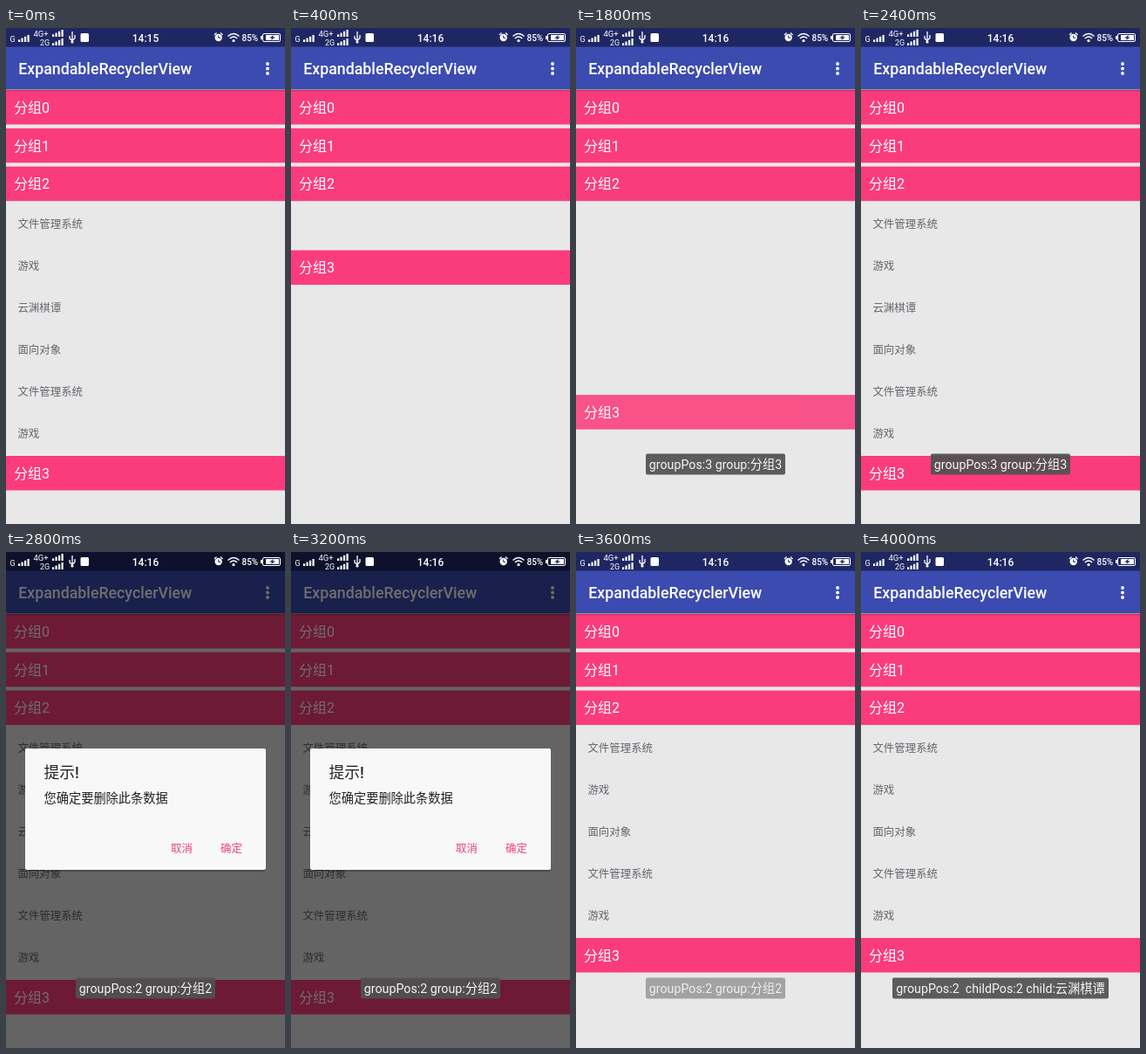
These frames come from a looping animation (320 by 568 pixels, 4200 ms). An HTML page:

```html
<!DOCTYPE html>
<html lang="zh-CN">
<head>
<meta charset="utf-8">
<style>
html, body { margin: 0; width: 100%; height: 100%; overflow: hidden; background: #e8e8e8; }
svg { display: block; width: 320px; height: 568px; }
text { font-family: Roboto, "Noto Sans CJK SC", "Noto Sans CJK", sans-serif; white-space: pre; }
</style>
</head>
<body>
<svg id="stage" viewBox="0 0 320 568"></svg>
<script>
const LOOP = 4200, STEP = 200;
const PINK = '#fb3c7c';
const stage = document.getElementById('stage');
const filesA = ['文件管理系统', '游戏', '云渊棋谭', '面向对象', '文件管理系统', '游戏'];
const filesB = ['文档', '程序', 'nub4', '非面向对象', '文档', '程序', 'nub4'];

const ramp = (t, a, b) => Math.min(1, Math.max(0, (t - a) / (b - a)));
const ease = p => (1 - Math.cos(Math.PI * p)) / 2;
const text = (s, x, y, size, fill, extra = '') =>
  `<text x="${x}" y="${y}" font-size="${size}" fill="${fill}" ${extra}>${s}</text>`;
const rect = (x, y, w, h, fill, extra = '') =>
  `<rect x="${x}" y="${y}" width="${w}" height="${h}" fill="${fill}" ${extra}/>`;
const fade = (alpha, body) => alpha > 0 ? `<g opacity="${alpha}">${body}</g>` : '';
const groupTop = i => 71 + 43.8 * i;

function group(i, y, alpha = 1) {
  return fade(alpha, rect(0, y, 320, 39.5, PINK) + text('分组' + i, 9, y + 25.7, 16, '#fff'));
}

function children(list, top, alpha) {
  return fade(alpha, list.map((s, i) => text(s, 13.4, top + 28.6 + 48 * i, 12.44, '#63666d')).join(''));
}

function signal(x, base, h) {
  return [0, 1, 2, 3].map(i => {
    const bar = h * (i + 1.5) / 4.5;
    return rect(x + 3.5 * i, base - bar, 2.2, bar, '#fff');
  }).join('');
}

function statusBar(clock) {
  const line = d => `<path d="${d}" fill="none" stroke="#fff" stroke-width="1.3"/>`;
  return signal(14, 16, 8) + signal(53, 10, 8) + signal(53, 20, 8) +
    text('G', 4.5, 16, 9, '#fff') + text('4G+', 31.5, 10, 9.5, '#fff') + text('2G', 39, 20, 9, '#fff') +
    line('M76 4V17M73 9v3l3 2.5l3-3V8') + '<circle cx="76" cy="16" r="1.6" fill="#fff"/>' +
    rect(85.5, 6, 9.5, 10, '#fff', 'rx="1.5"') +
    text(clock, 160, 15.5, 12, '#fff', 'text-anchor="middle" font-weight="500"') +
    '<circle cx="243.7" cy="11" r="4.2" fill="#fff"/>' +
    '<path d="M243.7 8.5V11.3H246" fill="none" stroke="#1f2763"/>' +
    line('M239 8l2.5-2.5M246 5.5L248.5 8') +
    line('M254.5 9.5q6.5-6 13 0M256.8 12q4.2-4 8.4 0') + '<circle cx="261" cy="14.6" r="1.6" fill="#fff"/>' +
    text('85%', 270.5, 15, 10, '#fff', 'font-weight="500"') +
    '<rect x="294.5" y="6.5" width="20" height="9" rx="1.5" fill="none" stroke="#fff"/>' +
    rect(292, 9, 2, 4, '#fff') + rect(298, 8, 15, 6, '#fff') +
    '<path d="M307 8l-5 3.5h3l-1 2.5l5-3.5h-3z" fill="#1f2763"/>';
}

function appBar() {
  return rect(0, 0, 320, 22, '#1f2763') + rect(0, 21.5, 320, 48.5, '#3b4bb0') +
    rect(0, 70, 320, 1.2, '#000', 'opacity=".35"') + rect(0, 71.2, 320, 1.5, '#000', 'opacity=".12"') +
    text('ExpandableRecyclerView', 14.2, 53, 17.78, '#fff', 'font-weight="500"') +
    [41, 46.5, 52].map(y => `<circle cx="300" cy="${y}" r="1.9" fill="#fff"/>`).join('');
}

function dialog() {
  return rect(22, 227, 276, 139, '#000', 'rx="3" opacity=".25"') +
    rect(22, 225, 276, 139, '#f8f8f8', 'rx="2"') +
    text('提示!', 43.5, 259, 17.78, '#222', 'font-weight="500"') +
    text('您确定要删除此条数据', 43.5, 287, 14.22, '#222') +
    text('取消', 189, 344, 12.44, '#f0437f', 'font-weight="500"') +
    text('确定', 246, 344, 12.44, '#f0437f', 'font-weight="500"');
}

function toast(s, w, alpha) {
  return fade(alpha, rect(160 - w / 2, 487.5, w, 24, '#505250', 'rx="2" opacity=".92"') +
    text(s, 160, 504.6, 14.22, '#f4f4f4', 'text-anchor="middle" xml:space="preserve"'));
}

function toasts(t) {
  const span = (a, b, c, d) => ramp(t, a, b) * (1 - ramp(t, c, d));
  const g = i => `groupPos:${i} group:分组${i}`;
  return toast(g(2), 160, span(450, 700, 1300, 1500)) +
    toast(g(3), 160, span(1450, 1700, 2450, 2650)) +
    toast(g(2), 160, span(2600, 2800, 3500, 3700)) +
    toast('groupPos:2  childPos:2 child:云渊棋谭', 248, span(3650, 3900, 5000, 5100));
}

function render(t) {
  const removed = t >= 3300;
  const list = removed ? filesA.filter((_, i) => i !== 2) : filesA;
  const closed = groupTop(3), open = 490 - 48 * removed;
  const up = ease(ramp(t, 220, 470)), down = ease(ramp(t, 1632, 1882));
  const y3 = open + (closed - open) * (up - down);
  const moving = t > 1632 && t < 1882;
  const alphaA = t < 1000 ? 1 - ramp(t, 100, 220) : ramp(t, 1882, 2000);
  const alphaB = ramp(t, 880, 1000) * (1 - ramp(t, 1500, 1620));
  const shown = ramp(t, 2500, 2700);
  const dim = 0.57 * shown * (1 - ramp(t, 3250, 3470));

  stage.innerHTML =
    '<clipPath id="list"><rect y="70" width="320" height="484"/></clipPath>' +
    rect(0, 0, 320, 568, '#e8e8e8') +
    [0, 1, 2].map(i => group(i, groupTop(i))).join('') +
    '<g clip-path="url(#list)">' + children(list, 200, alphaA) + children(filesB, 244, alphaB) + '</g>' +
    group(3, y3, moving ? 0.87 : 1) +
    appBar() +
    rect(0, 0, 320, 568, '#000', `opacity="${dim}"`) +
    statusBar(t < 200 ? '14:15' : '14:16') +
    fade(shown * (1 - ramp(t, 3250, 3350)), dialog()) +
    toasts(t);
}

let last = -1;
const start = performance.now();
function tick() {
  const t = Math.floor(((performance.now() - start) % LOOP) / STEP) * STEP;
  if (t !== last) render(last = t);
  requestAnimationFrame(tick);
}
tick();
</script>
</body>
</html>
```
